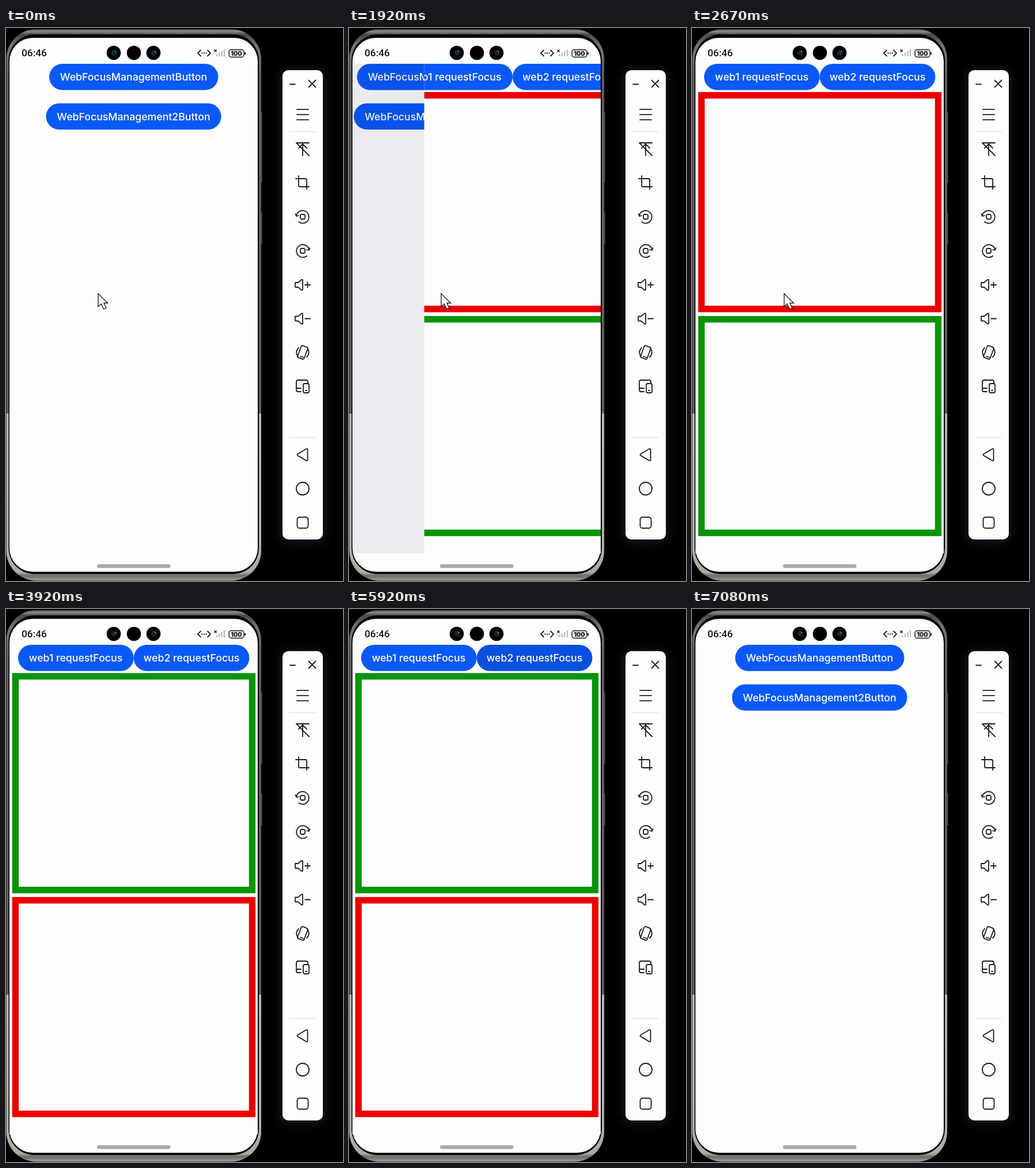
Animation, 585 px wide and 958 px high, one loop 7.16 s. Source, as an HTML page:

```html
<!DOCTYPE html>
<html lang="en">
<head>
<meta charset="utf-8">
<title>Web focus management</title>
<style>
  html, body { margin: 0; width: 100%; height: 100%; overflow: hidden; background: #000; }
  svg { display: block; width: 585px; height: 958px; }
  .label { font: 500 17.7px Inter, Roboto, sans-serif; fill: #fff; text-anchor: middle; }
  .clock { font: 500 17.3px Roboto, Inter, sans-serif; fill: #151515; }
  .level { font: 800 10.5px Inter, Roboto, sans-serif; fill: #111; text-anchor: middle; }
  .blue { fill: #0a59f7; }
  .blue.pressed { fill: #0950de; }
  .web { fill: none; stroke: #eb0000; stroke-width: 11.3; }
  .web.focused { stroke: #079407; }
  .icon { fill: none; stroke: #1b1b1b; stroke-width: 1.8; stroke-linecap: round; stroke-linejoin: round; }
  .rule { stroke: #d3d3ee; stroke-width: 1.3; stroke-dasharray: 1.5 1; }
  .glow { fill: #1c1c2c; filter: blur(9px); }
</style>
</head>
<body>
<svg viewBox="0 0 585 958">
  <defs>
    <linearGradient id="metal" x1="0" y1="0" x2="0" y2="1">
      <stop offset="0" stop-color="#4c4c4c"/>
      <stop offset=".004" stop-color="#8c8c8c"/>
      <stop offset=".01" stop-color="#484848"/>
      <stop offset=".03" stop-color="#777"/>
      <stop offset=".08" stop-color="#5e5e5e"/>
      <stop offset=".697" stop-color="#5e5e5e"/>
      <stop offset=".697" stop-color="#bab7ae"/>
      <stop offset=".985" stop-color="#aeaba4"/>
      <stop offset=".991" stop-color="#6c6a66"/>
      <stop offset="1" stop-color="#a3a099"/>
    </linearGradient>
    <clipPath id="stageClip"><rect x="6" y="62" width="431" height="848"/></clipPath>
    <clipPath id="pageClip"><rect id="pageEdge" x="6" y="62" width="431" height="848"/></clipPath>
  </defs>

  <!-- phone body -->
  <path d="M443.5 145V268M443.5 320V375" stroke="#4a4a4a" stroke-width="2"/>
  <rect x=".5" y="2" width="442.5" height="955.5" rx="52" fill="url(#metal)"/>
  <rect x="4.500" y="11" width="434.500" height="935" rx="45"/>
  <rect x="6" y="17" width="431" height="925" rx="41" fill="#fdfdfd"/>

  <!-- status bar -->
  <text class="clock" x="27" y="49">06:46</text>
  <circle cx="187" cy="43" r="12.3"/>
  <circle cx="222" cy="43" r="12.3"/>
  <circle cx="256" cy="43" r="12.3"/>
  <g fill="#0d2c2e">
    <circle cx="188" cy="43" r="5"/><circle cx="257" cy="43" r="5"/>
  </g>
  <g fill="#4d8078">
    <circle cx="190" cy="41" r="1.3"/><circle cx="259" cy="41" r="1.3"/>
  </g>
  <path class="icon" d="M338 38.5L333 43.5L338 48.5M350 38.5L355 43.5L350 48.5"/>
  <path d="M339.5 43.5h2m1.5 0h2m1.5 0h2" stroke="#1b1b1b" stroke-width="2"/>
  <path d="M361.5 37.5l4 4m0-4l-4 4" stroke="#1b1b1b" stroke-width="1.5"/>
  <path d="M365.5 49v-4m4.5 4v-6.5m4.5 6.5v-9m4.5 9v-12" stroke="#bdbdbd" stroke-width="2.4"/>
  <rect x="387" y="37.5" width="26" height="13" rx="4" fill="#e4e4e4" stroke="#1b1b1b" stroke-width="1.4"/>
  <path d="M415 42v4" stroke="#1b1b1b" stroke-width="2"/>
  <text class="level" x="400" y="47.9">100</text>

  <!-- pages -->
  <g clip-path="url(#stageClip)">
    <g id="home">
      <rect id="openBtn" class="blue" x="75" y="62" width="293.5" height="45.5" rx="22.7"/>
      <text class="label" x="221.5" y="91">WebFocusManagementButton</text>
      <rect class="blue" x="69.5" y="130.5" width="304" height="45.5" rx="22.7"/>
      <text class="label" x="221.5" y="159.5">WebFocusManagement2Button</text>
    </g>
    <rect id="shade" x="6" y="62" width="431" height="848" fill="#0c0c40" opacity="0"/>
    <g id="page" clip-path="url(#pageClip)">
      <rect x="6" y="62" width="431" height="848" fill="#fdfdfd"/>
      <g id="content">
        <rect id="btn1" class="blue" x="21" y="62" width="200.7" height="45.5" rx="22.7"/>
        <text class="label" x="121" y="91">web1 requestFocus</text>
        <rect id="btn2" class="blue" x="221.7" y="62" width="200.7" height="45.5" rx="22.7"/>
        <text class="label" x="322" y="91">web2 requestFocus</text>
        <rect id="web1" class="web" x="16.4" y="116.6" width="411" height="370.2"/>
        <rect id="web2" class="web" x="16.4" y="504.6" width="411" height="370"/>
      </g>
    </g>
  </g>
  <rect x="158" y="929" width="127.5" height="6.5" rx="3.2" fill="#a9a9a9"/>
  <path id="cursor" d="M160 460V482.5L165.3 478L169.5 487L174 485L170 476.5H176.5Z" fill="#fff" stroke="#111" stroke-width="1.3"/>

  <!-- tool panel -->
  <rect class="glow" x="478" y="73" width="74" height="817" rx="12"/>
  <rect x="480" y="73" width="70" height="813" rx="10" fill="#fdfdfd"/>
  <path class="rule" d="M492 179.5H538M492 709.5H538"/>
  <g class="icon">
    <path d="M493 97.5H502M525.5 90.5l12 12m0-12l-12 12"/>
    <path d="M505 141H525M505 150H525M505 159H525" stroke="#3a3a3a" stroke-width="2"/>
    <g transform="translate(515 210)">
      <path d="M-10-11H11M-11-11L11 11M0-10V11M-7-2L0-9L7-2"/>
    </g>
    <g transform="translate(515 268)">
      <path d="M-12-7H5Q7-7 7-5V11M-7-12V5Q-7 7-5 7H11"/>
    </g>
    <g id="turn" transform="translate(515 327)">
      <path d="M-11-2A11 11 0 1 1-7 9M-12.5-5L-11-1L-7-2"/>
      <rect x="-4" y="-4" width="8" height="8" rx="2"/>
    </g>
    <use href="#turn" transform="translate(1030 59) scale(-1 1)"/>
    <g id="speaker" transform="translate(515 445)">
      <path d="M-13-4H-8L-2-9Q0-10 0-8V8Q0 10-2 9L-8 4H-12Q-13 4-13 3ZM4 0H13"/>
    </g>
    <path d="M523.5 440.5v9"/>
    <use href="#speaker" y="58.5"/>
    <g transform="translate(515 562)">
      <rect x="-6" y="-11" width="12" height="22" rx="2.5" transform="rotate(20)"/>
      <path d="M-4 7L1 8.5M-7-8Q-14-1-8 8M7 8Q14 1 8-8"/>
    </g>
    <g transform="translate(515 621)">
      <path d="M9-6V-8Q9-11 6-11H-8Q-11-11-11-8V6Q-11 9-8 9H-3M-10 3H-3"/>
      <rect x="1" y="-5" width="10" height="16" rx="2.5"/>
      <path d="M5 7H7"/>
    </g>
    <path d="M506 738.2L521.5 729Q523.5 728.5 523.5 731V748Q523.5 750.5 521.5 749.5L506 740.5Q505 739.3 506 738.2Z"/>
    <circle cx="515" cy="798" r="11"/>
    <rect x="505.5" y="847.5" width="19" height="19" rx="4"/>
  </g>
</svg>
<script>
  const LOOP = 7160, STEP = 250 / 3;
  const LEFT = 6, WIDTH = 431, PARALLAX = 86;
  const OPEN = 1782, BACK = 6116, TO_WEB1 = 3660, TO_WEB2 = 6000;
  const el = id => document.getElementById(id);
  const within = (t, from, to) => t >= from && t < to;

  // critically damped spring, 0 to 1
  function spring(ms) {
    const x = Math.max(0, ms) * 0.0185;
    return 1 - (1 + x) * Math.exp(-x);
  }

  function render(t) {
    const shown = t < BACK ? spring(t - OPEN) : 1 - spring(t - BACK);
    const gap = (1 - shown) * WIDTH;
    el("pageEdge").setAttribute("x", LEFT + gap);
    el("content").setAttribute("transform", `translate(${gap / 2} 0)`);
    el("home").setAttribute("transform", `translate(${-PARALLAX * shown} 0)`);
    el("shade").setAttribute("opacity", 0.1 * shown);
    el("page").style.display = shown > 0.002 ? "" : "none";

    el("web1").classList.toggle("focused", within(t, TO_WEB1, TO_WEB2));
    el("web2").classList.toggle("focused", t < TO_WEB1 || within(t, TO_WEB2, BACK));
    el("openBtn").classList.toggle("pressed", within(t, 1580, 1740));
    el("btn1").classList.toggle("pressed", within(t, 3490, TO_WEB1));
    el("btn2").classList.toggle("pressed", within(t, 5830, TO_WEB2));
    el("cursor").style.display = t < 3740 ? "" : "none";
  }

  const start = performance.now();
  function tick() {
    const t = (performance.now() - start) % LOOP;
    render(Math.floor((t + 4) / STEP) * STEP);
    requestAnimationFrame(tick);
  }
  tick();
</script>
</body>
</html>
```
